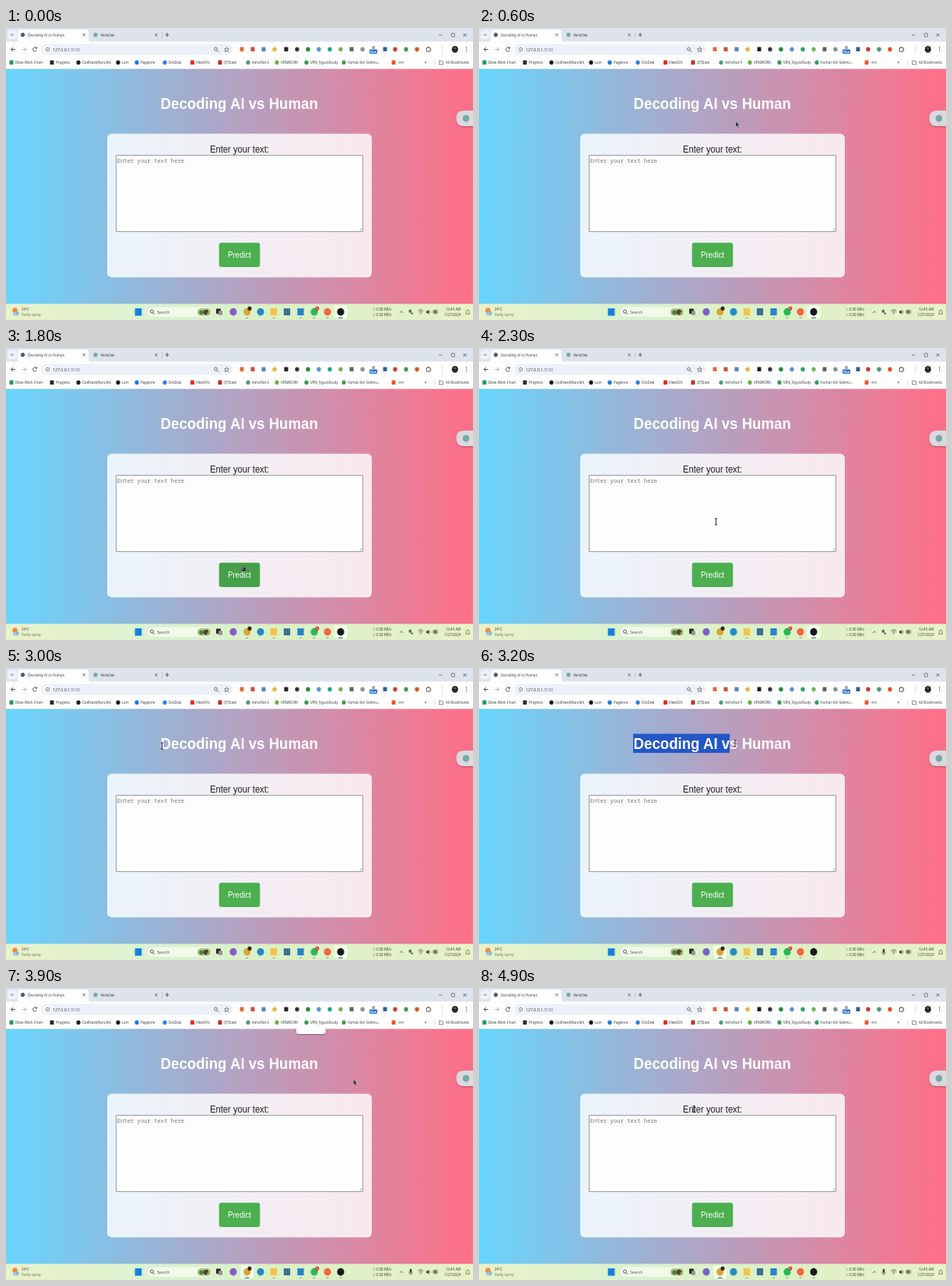
Animation, 600 px wide and 375 px high, one loop 5000 ms. Source, as an HTML page:

```html
<!DOCTYPE html>
<html lang="en">
<head>
<meta charset="utf-8">
<title>Decoding AI vs Human</title>
<style>
  html, body { margin: 0; width: 100%; height: 100%; overflow: hidden; }
  svg { display: block; width: 100vw; height: 100vh; }
  text { font-family: "Open Sans", "Noto Sans", sans-serif; white-space: pre; }
  .arial { font-family: "Liberation Sans", Arial, sans-serif; }
  .mono { font-family: "Noto Sans Mono", monospace; }
</style>
</head>
<body>
<svg id="stage" viewBox="0 0 600 375" preserveAspectRatio="none"></svg>
<script>
const LOOP = 5000, STEP = 100;
const INK = '#33363b';

// The 16:9 screen is shown at 16:10, so all lettering shares one aspect.
const text = (x, y, str, size, fill = INK, extra = '') =>
  `<text transform="translate(${x} ${y}) scale(.9 1)" font-size="${size}" fill="${fill}" ${extra}>${str}</text>`;
const rect = (x, y, w, h, fill, r = 0, extra = '') =>
  `<rect x="${x}" y="${y}" width="${w}" height="${h}" rx="${r}" fill="${fill}" ${extra}/>`;
const dot = (x, y, r, fill, extra = '') =>
  `<ellipse cx="${x}" cy="${y}" rx="${r * .93}" ry="${r}" fill="${fill}" ${extra}/>`;
const line = (d, color = INK, w = .8, extra = '') =>
  `<path d="${d}" fill="none" stroke="${color}" stroke-width="${w}" ${extra}/>`;
const square = (x, y, s, fill) => rect(x - s * .46, y - s / 2, s * .92, s, fill, .6);
const cross = (x, y, s = 1.7) =>
  line(`M${x - s} ${y - s}l${2 * s} ${2 * s}m0 ${-2 * s}l${-2 * s} ${2 * s}`, INK, .7);

const defs = `<defs>
  <linearGradient id="page"><stop stop-color="#68d5fd"/><stop offset="1" stop-color="#ff6e86"/></linearGradient>
  <linearGradient id="bar"><stop stop-color="#e9f2c8"/><stop offset=".3" stop-color="#dcf2d0"/>
    <stop offset=".6" stop-color="#daf1c4"/><stop offset="1" stop-color="#e8f2c6"/></linearGradient>
  <filter id="soft" x="-30%" y="-60%" width="160%" height="260%">
    <feDropShadow dx="0" dy="1" stdDeviation="1.3" flood-opacity=".3"/></filter>
</defs>`;

function tabs() {
  return rect(0, 0, 600, 18, '#dde3ed') +
    rect(2, 2.5, 12, 12, '#eff3f9', 3.5) + line('M6.2 7.8l1.8 1.8 1.8-1.8') +
    '<path d="M12 17.5q3 0 3-3V5.5q0-3.5 3.5-3.5h84q3.5 0 3.5 3.5v9q0 3 3 3z" fill="#fff"/>' +
    dot(21.5, 8.8, 2.7, '#555b63') +
    text(28, 10.6, 'Decoding AI vs Human', 5) + cross(100, 8.8) +
    rect(109, 2, 90, 14, '#b7bdc7', 4, 'id="tabHover"') +
    dot(115, 8.8, 2.8, '#74aa9c') +
    text(121.5, 10.6, 'VerbOwl', 5) + cross(193, 8.8) +
    line('M200.5 5v8', '#a9b0bb', .6) + line('M204.8 8.8h4.6m-2.3-2.5v5') +
    line('M556 9h4.5', INK, .6) +
    rect(572.3, 6.8, 4, 4.3, 'none', .5, `stroke="${INK}" stroke-width=".6"`) + cross(589.5, 9, 2);
}

function toolbar() {
  const extensions = [
    [303, '#e06b3c', 1], [317, '#d9472f', 1], [331, '#5a7fb5', 1], [345, '#e9b43c', 0],
    [360, '#1d1d1d', 1], [374, '#35383d', 0], [388, '#1b8c3c', 0], [402, '#4d93e6', 0],
    [416, '#21a67a', 0], [430, '#73b45d', 0], [444, '#5f6368', 1], [458, '#8b9098', 0],
    [487, '#2f5f8d', 1], [500, '#c93d2b', 0], [514, '#3a9b5e', 0], [528, '#d3542f', 0]
  ];
  return rect(0, 17.5, 600, 35, '#fff') +
    line('M11.7 27.5H6.5m2.5-2.7l-2.6 2.7 2.6 2.7', INK, .9) +
    line('M20.5 27.5h5.2m-2.5-2.7l2.6 2.7-2.6 2.7', '#a4a7ab', .9) +
    line('M39.2 25.8a2.5 2.7 0 1 0 .2 2.8M39.6 24.2v2h-2', INK, .9) +
    rect(45.5, 20.5, 246, 14, '#edf1f9', 7) + dot(53.5, 27.5, 4.8, '#fff') +
    dot(53.5, 27.5, 2.5, 'none', `stroke="${INK}" stroke-width=".6"`) +
    line('M53.5 27v1.7m0-3v.7', INK, .6) +
    text(60, 29.7, '127.0.0.1<tspan fill="#6a6f76">:5100</tspan>', 5.8) +
    dot(269.5, 27, 2, 'none', `stroke="${INK}" stroke-width=".7"`) + line('M271 28.7l2 2.1') +
    line('M283.5 24.6l.9 2 2 .2-1.5 1.5.5 2.2-1.9-1.2-1.9 1.2.5-2.2-1.5-1.5 2-.2z', INK, .6) +
    extensions.map(([x, c, sq]) => sq ? square(x, 27.3, 5.4, c) : dot(x, 27.3, 2.9, c)).join('') +
    square(472, 25, 4, '#a7abb1') + rect(467, 27.5, 10, 5.5, '#2d6ed0', 1.2) +
    text(472, 31.7, 'New', 4, '#fff', 'text-anchor="middle" font-weight="700"') +
    line('M540.3 25.5h1.6v-1h1.5v1h1.5v1.5h.9v1.5h-.9v1.8h-4.6z', INK, .8) +
    line('M560.5 23v9', '#c3d3ef', .7) + dot(576.8, 27.4, 4.4, '#25282c') +
    dot(576.8, 26, 1.2, '#807064') +
    [25, 27.4, 29.8].map(y => dot(591.5, y, .65, INK)).join('');
}

function bookmarks() {
  const marks = [
    [7, '#1f9d58', 12, 'Deve Work Chart'], [59, '#2a2a20', 64, 'Progress'],
    [93, '#1b1f23', 98, 'CodNest(Marufel)', 1], [144, '#16181b', 148.5, 'Lum', 1],
    [168, '#1877f2', 173, 'Pagelore', 1], [204, '#2d7ff0', 209, 'DotZeal', 1],
    [239.5, '#f0281e', 244, 'ViewOrb'], [275, '#c22b2b', 280, 'QTSlate'],
    [311, '#4c9b8b', 316, 'VerbOwl-3', 1], [348, '#7bab35', 353, 'VRNWORK', 1],
    [386, '#3a9a55', 391, 'VRN_FigureStudy', 1], [434, '#3a9a55', 439, 'Farhan Ibn Selimu...', 1],
    [498, '#ea5a2a', 504, 'বাংলা']
  ];
  return marks.map(([ix, c, tx, name, round]) =>
      (round ? dot(ix, 44.2, 2.8, c) : square(ix, 44.2, 5.4, c)) + text(tx, 46, name, 5)).join('') +
    text(537.5, 46, '»', 6.5) + line('M550.8 39.5v9', '#c3d3ef', .7) +
    line('M556.7 42h1.8l.6.8h2.6v4h-5z', INK, .6) + text(565, 46, 'All Bookmarks', 5);
}

function page() {
  return rect(0, 52, 600, 303, 'url(#page)') +
    rect(198, 84.5, 0, 24.5, '#2456c6', 0, 'id="selection"') +
    text(299.7, 104, 'Decoding AI vs Human', 20.7, '#fff',
      'class="arial" font-weight="700" text-anchor="middle"') +
    rect(130, 135.7, 340, 184.6, '#fff', 6, 'fill-opacity=".82"') +
    text(300, 160, 'Enter your text:', 12.45, '#222', 'class="arial" text-anchor="middle"') +
    rect(141.5, 163.5, 317, 98, '#fefdfe', .5, 'stroke="#85858a" stroke-width=".8"') +
    text(142.7, 173, 'Enter your text here', 8, '#757575', 'class="mono"') +
    line('M454.5 260.3l3-3.4m-1.2 3.4l1.2-1.4', '#777', .5) +
    rect(273.7, 275.8, 52.6, 31.2, '#4caf50', 3.2, 'id="button"') +
    text(300, 295, 'Predict', 10.75, '#fff', 'class="arial" text-anchor="middle"') +
    '<path id="tip" d="M373 52h37.5v4q0 3-3 3h-31.500q-3 0-3-3z" fill="#fff" filter="url(#soft)"/>' +
    '<path d="M600 106h-11.500q-10 0-10 10t10 10H600z" fill="#d9d9df" filter="url(#soft)"/>' +
    dot(591, 116, 4.6, '#78aaa0');
}

function taskbar() {
  const apps = [
    [292, '#7a63c8', 1], [309.7, '#dba62f', 1], [327, '#2689c9', 1], [344, '#f3c14b'],
    [361, '#3b6f94'], [378.5, '#2583d0'], [396, '#27b955', 1], [413, '#f2683c', 1], [430, '#17191d', 1]
  ];
  const tray = '#3a4038';
  return rect(0, 354.3, 600, 20.7, 'url(#bar)') +
    dot(11.5, 362.800, 3.6, '#f08a35') + dot(14, 366.5, 2.8, '#8fb3da') + dot(11, 367, 2.3, '#a9c6e4') +
    text(20, 363, '24°C', 5) + text(20, 370.3, 'Partly sunny', 4.8, '#666c60') +
    square(170, 364.8, 9.6, '#1583d8') +
    rect(181, 358, 84, 13.4, '#f2f9e9', 6.7, 'stroke="#d5e2c9" stroke-width=".5"') +
    dot(187.5, 364, 2.1, 'none', `stroke="${INK}" stroke-width=".8"`) + line('M189 365.8l1.8 2') +
    text(194, 366.9, 'Search', 5.8, '#4b5148') +
    rect(246, 360, 17, 9.5, '#b2c584', 4.5) + dot(251, 365.2, 3, '#587c3b') +
    dot(257, 365, 3.5, '#3c4a38') + dot(259.5, 367, 1.8, '#d58d38') +
    rect(270, 360.5, 6, 6.5, '#26292c', .7) + rect(273, 363.3, 5, 5.5, '#91979a', .7) +
    rect(0, 356.3, 17, 16.8, '#fff', 2.5, 'id="active" fill-opacity=".65"') +
    apps.map(([x, c, round]) => round ? dot(x, 364.6, 4.9, c) : square(x, 364.6, 9, c)).join('') +
    [344, 378.5, 396, 413, 309.7, 430].map(x => rect(x - 1.6, 371.8, 3.2, .9, '#85907e', .4)).join('') +
    rect(0, 371.7, 6, 1.1, '#2877bd', .5, 'id="activeLine"') +
    dot(313, 360.3, 2.7, '#26292d') + dot(399.8, 360.3, 2.7, '#d8453b') +
    text(399.8, 361.8, '1', 4, '#fff', 'text-anchor="middle"') +
    text(471, 363, '↑: 0.00 KB/s', 5) + text(471, 370.2, '↓: 0.00 KB/s', 5) +
    line('M506 365.800l2-2 2 2', tray, .8) +
    `<g id="sync">${dot(519.3, 363.7, 2.1, '#4a7291')}${dot(521.6, 366.4, 1.5, '#4b9264')}</g>` +
    `<g id="mic">${rect(518.7, 360.8, 2.6, 5, tray, 1.3)}${line('M517.600 364.500q0 2.700 2.400 2.700t2.400-2.700M520 367v2', tray, .6)}</g>` +
    line('M529.500 363.300q3.300-3.300 6.600 0M530.800 365q2-2 4 0', tray, .8) + dot(532.8, 366.800, .8, tray) +
    `<path d="M540 363.500h1.400l1.800-1.700v6l-1.800-1.700H540z" fill="${tray}"/>` +
    line('M544.500 363q1.200 1.800 0 3.600', tray, .6) +
    rect(549, 362.4, 5.4, 4.3, 'none', .8, `stroke="${tray}" stroke-width=".7"`) + rect(550, 363.4, 3, 2.3, tray) +
    text(584.3, 363, '12:45 AM', 5, INK, 'text-anchor="end"') +
    text(584.3, 370.2, '1/27/2024', 5, INK, 'text-anchor="end"') +
    line('M590.600 367.200l.7-1.200v-1.700q0-2.300 1.900-2.300t1.900 2.300v1.700l.7 1.200z', tray, .6);
}

const pointers = `<g id="cursor">
  <path id="arrow" d="M0 0v6.800l1.500-1.400 1.200 2.700 1.100-.5-1.200-2.600h2z" fill="#24262a" stroke="#e8e8ee" stroke-width=".3"/>
  <path id="beam" d="M-1.600-4h3.200M0-4v8M-1.600 4h3.200" fill="none" stroke="#1d1d22" stroke-width=".9"/>
  <path id="hand" d="M-.6-4q.6-.8 1.200 0v2.700l2.300.7q.6.300.4 1.200L2.700 4h-3.700L-2.700 1.200q.2-.9 1 -.4l1.100.5z" fill="#3e2a4c" stroke="#b9a0c8" stroke-width=".3"/>
</g>`;

const stage = document.getElementById('stage');
stage.innerHTML = defs + page() + tabs() + toolbar() + bookmarks() + taskbar() + pointers;

const $ = id => document.getElementById(id);
const show = (id, on) => $(id).setAttribute('visibility', on ? 'visible' : 'hidden');
// The tip hangs below the bookmark row, so keep its shadow off the white bar.
stage.insertBefore($('tip'), stage.querySelector('#tabHover').parentNode === stage ? $('tip').nextSibling : null);

// time, x, y of the pointer
const path = [
  [100, 430, 358], [600, 330, 120], [1000, 192, 8], [1100, 184.5, -1], [1200, 188, 3],
  [1500, 240, 130], [1800, 305, 283], [2000, 318, 292], [2400, 300, 200], [2800, 215, 112],
  [3000, 200.5, 100], [3100, 258, 98], [3200, 329, 97], [3300, 404, 97], [3500, 425, 75],
  [3700, 440, 105], [3900, 446.5, 117.5], [4200, 345, 290], [4500, 318, 235],
  [4800, 304, 156], [4900, 276, 155.5]
];

function pointerAt(t) {
  const i = path.findIndex(p => p[0] >= t);
  if (i < 1) return path[i < 0 ? path.length - 1 : 0].slice(1);
  const [a, b] = [path[i - 1], path[i]];
  const k = (t - a[0]) / (b[0] - a[0]);
  return [a[1] + (b[1] - a[1]) * k, a[2] + (b[2] - a[2]) * k];
}

const inside = (x, y, l, t, r, b) => x >= l && x <= r && y >= t && y <= b;

function draw(t) {
  const [x, y] = pointerAt(t);
  const onButton = inside(x, y, 273, 275, 327, 307);
  const onText = inside(x, y, 198, 84, 404, 109) || inside(x, y, 142, 163, 459, 262) ||
    inside(x, y, 262, 150, 338, 162);
  const moving = t >= 100;
  $('cursor').setAttribute('transform', `translate(${x} ${y})`);
  show('hand', moving && onButton);
  show('beam', moving && onText);
  show('arrow', moving && !onButton && !onText);
  $('button').setAttribute('fill', onButton ? '#45a049' : '#4caf50');
  show('tabHover', moving && inside(x, y, 109, -2, 199, 16));

  const selecting = t > 3000 && t < 3500;
  $('selection').setAttribute('width', selecting ? Math.min(203.5, Math.max(0, x - 205)) : 0);
  show('tip', t >= 3500 && t < 4000);

  const browser = t >= 3100, appX = browser ? 309.7 : 430;
  $('active').setAttribute('x', appX - 8.5);
  $('activeLine').setAttribute('x', appX - 3);
  show('mic', browser);
  show('sync', !browser);
}

const start = performance.now();
function tick() {
  const t = (performance.now() - start) % LOOP;
  draw(Math.floor(t / STEP) * STEP);
  requestAnimationFrame(tick);
}
tick();
</script>
</body>
</html>
```
